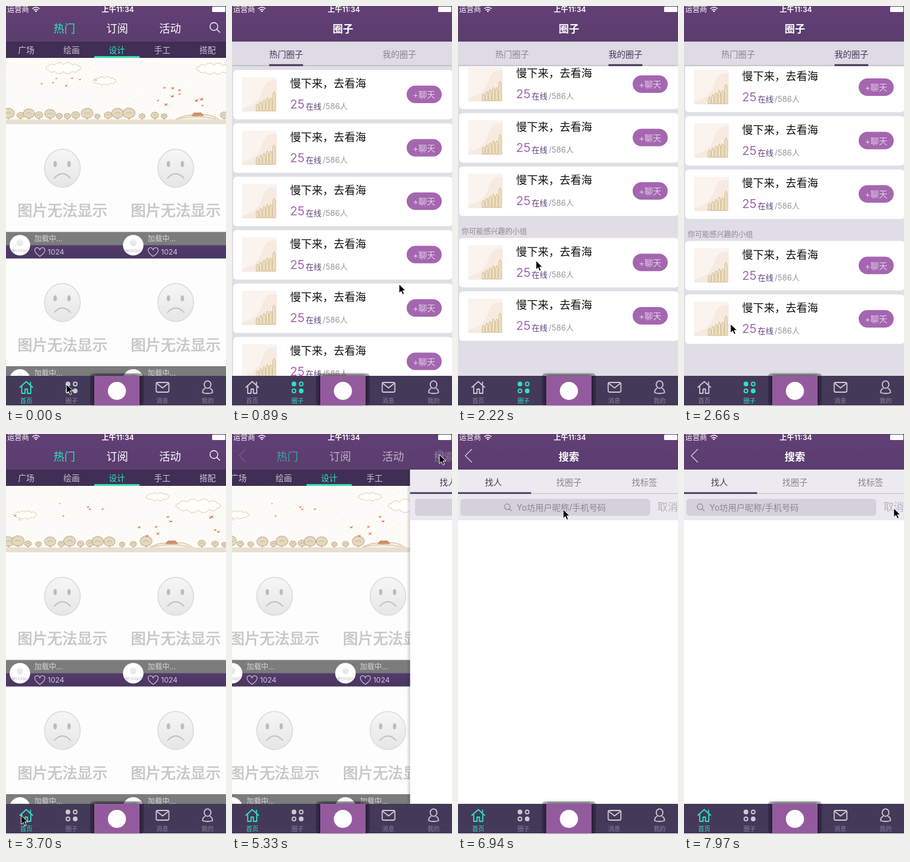
An HTML page for the animation above (8000 ms loop, 364 by 663 pixels).

```html
<!DOCTYPE html>
<html lang="zh-CN">
<head>
<meta charset="utf-8">
<style>
html, body { margin: 0; width: 100%; height: 100%; overflow: hidden; background: #fff; }
svg { display: block; font-family: Inter, "Noto Sans CJK SC", "Noto Sans CJK", sans-serif; }
.tab { stroke: #cdc8d5; stroke-width: 1.8; fill: none; stroke-linejoin: round; stroke-linecap: round; }
.tab text { fill: #8b8396; stroke: none; }
.tab .dot { fill: #cdc8d5; }
.tab.on { stroke: #2be6c0; }
.tab.on text, .tab.on .dot { fill: #2be6c0; }
#fail text { stroke: #c6c6c6; stroke-width: .7; }
#tile { filter: drop-shadow(0 -1px 3px rgba(0, 0, 0, .6)); }
</style>
</head>
<body>
<svg id="stage" width="364" height="663" viewBox="0 0 364 663"></svg>
<script>
const LOOP = 8000, STEP = 147.7, PAGE = 375;
const GREEN = '#2be6c0', PLUM = '#a566b0', DARK = '#433557', GREY = '#88848e';

// Markup helpers
const text = (x, y, s, size, fill, anchor = 'start', weight = 400) =>
  `<text x="${x}" y="${y}" font-size="${size}" fill="${fill}" text-anchor="${anchor}" font-weight="${weight}">${s}</text>`;
const mid = (x, y, s, size, fill, weight) => text(x, y, s, size, fill, 'middle', weight);
const rect = (x, y, w, h, fill, r = 0) =>
  `<rect x="${x}" y="${y}" width="${w}" height="${h}" rx="${r}" fill="${fill}"/>`;
const line = (d, stroke, w = 1, fill = 'none') =>
  `<path d="${d}" stroke="${stroke}" stroke-width="${w}" fill="${fill}"/>`;
const group = (id, body) => `<g id="${id}">${body}</g>`;
const times = (n, f) => Array.from({ length: n }, (_, i) => f(i)).join('');

// Seeded random numbers: returns rnd(low, high)
function seeded(seed) {
  return (lo, hi) => {
    seed = (seed * 16807) % 2147483647;
    return lo + (hi - lo) * seed / 2147483647;
  };
}

// Scalloped outline used for clouds and trees
function blob(x, y, rx, ry, fill, stroke) {
  const n = 12, point = i => [x + rx * Math.cos(i * Math.PI * 2 / n), y + ry * Math.sin(i * Math.PI * 2 / n)];
  let d = `M${point(0)}`;
  for (let i = 1; i <= n; i++) {
    const a = point(i - 1), b = point(i), r = Math.hypot(a[0] - b[0], a[1] - b[1]) * .6;
    d += `A${r} ${r} 0 0 1 ${b}`;
  }
  return line(d + 'Z', stroke, .8, fill);
}
const cloud = ([x, y, rx]) => blob(x, y, rx, 2 + rx / 8, '#fffefa', '#cbbd98');
const tree = (x, r) =>
  line(`M${x} ${186 - r}V190`, '#a48d5f') + blob(x, 187 - r, r, r * .8, '#e3d8c0', '#a89367') +
  line(`M${x - r / 2} ${188 - r}q${r / 2} -4 ${r} 0`, '#b49f73', .7);
const bird = (x, y, s) =>
  `<path transform="translate(${x} ${y}) scale(${s})" d="M-4 -2L0 0L3 -3L2 1L4 2L0 2L-3 3L-1 1Z" fill="#e2714c"/>`;

function banner(id, seed, clouds, hill) {
  const rnd = seeded(seed);
  let trees = '';
  for (let x = 4; x < 364; x += rnd(13, 22)) {
    if (Math.abs(x - hill) > 38) trees += tree(x, rnd(0, 1) < .25 ? rnd(8, 10) : rnd(4, 6.5));
  }
  return group(id,
    rect(-4, 86, PAGE, 110, '#fefdfb', 6) + rect(-4, 86, PAGE, 110, 'url(#grain)', 6) +
    clouds.map(cloud).join('') +
    line(`M${hill - 38} 190q22 -13 38 -8q22 -7 40 8`, '#b49f73', .8, '#f8f1e4') +
    line(`M${hill - 8} 182h20l-4 -5h-12z`, '#a48d5f', .7, '#de8a66') +
    line(`M${hill - 30} 187q30 -7 62 0`, '#b49f73', .7) +
    trees + rect(-4, 188, PAGE, 8, '#e9dfd0') +
    times(7, () => bird(rnd(15, 160), rnd(105, 150), rnd(.4, .7))) +
    times(10, () => bird(rnd(hill - 80, 352), rnd(133, 170), rnd(.6, 1))));
}

const face = `<ellipse rx="29.5" ry="31.5" fill="url(#skin)" stroke="#dadada" stroke-width="1.6"/>
  <ellipse cx="-12" cy="-7" rx="2.8" ry="5" fill="#bcbcbc"/><ellipse cx="11" cy="-7" rx="2.8" ry="5" fill="#bcbcbc"/>
  <path d="M-14 17Q0 1 14 17" fill="none" stroke="#c0c0c0" stroke-width="1.8"/>`;

const post = (x, y) => `<g transform="translate(${x} ${y})">
  ${rect(-4, 0, 188, 179, '#fdfdfd')}
  <use href="#fail" x="93.3" y="73"/>
  ${rect(-4, 178.5, 188, 22.5, '#7c7c7c') + rect(-4, 200.5, 188, 22, 'url(#band)')}
  ${text(47, 194, '加载中...', 12, '#d6d6d6') + text(69, 216, '1024', 12, '#d0c8da')}
  ${line('M56 219C44 211 47 204.500 52 204.500Q55 205 56 208Q57 205 60 204.500C65 204.500 68 211 56 219Z', '#cfc6d8', 1.2)}
  <circle cx="23" cy="200.5" r="17" fill="#fff"/>
  <use href="#fail" transform="translate(23 196.500) scale(.18)"/></g>`;

const rnd = seeded(77);
const skyline = times(6, i => {
  const h = rnd(8, 17) + 2.5 * i;
  return line(`M${40 + i * 5.5} 68v${-h}l2 -4l2 4v${h}z`, '#c4a873', .7, '#efe2c6');
});
const card = y => `<g transform="translate(0 ${y})">
  ${rect(2, 0, 363, 82, '#fff', 6) + rect(17, 12, 57, 57, '#faf3ee')}
  ${line('M17 64Q44 58 50 36T74 18V69H17Z', 'none', 0, '#f6eae1') + skyline}
  ${text(96, 29, '慢下来，去看海', 18, '#111')}
  ${text(96, 64, '25', 20, PLUM) + text(122, 65, '在线', 13, '#5d3d78') + text(150, 65, '/586人', 13, '#98959c')}
  ${rect(289, 26, 58, 29, PLUM, 14.5) + mid(318, 46, '+聊天', 14, '#e2d0e7')}</g>`;
const cards = (n, y) => times(n, i => card(y + 88.5 * i));

const tab = (id, x, label, icon) =>
  `<g class="tab" id="${id}">${icon}${mid(x, 658, label, 10, '')}</g>`;
const lens = (x, y, r, color, w) =>
  `<circle cx="${x}" cy="${y}" r="${r}" fill="none" stroke="${color}" stroke-width="${w}"/>` +
  line(`M${x + r * .7} ${y + r * .7}l${r * .85} ${r * .85}`, color, w);

const defs = `<defs>
  <linearGradient id="nav" x2="0" y2="1"><stop stop-color="#633f76"/><stop offset="1" stop-color="#5a3d6e"/></linearGradient>
  <linearGradient id="band" x2="0" y2="1"><stop stop-color="#533b6b"/><stop offset="1" stop-color="#493662"/></linearGradient>
  <linearGradient id="edge"><stop stop-opacity="0"/><stop offset="1" stop-opacity=".18"/></linearGradient>
  <linearGradient id="skin" x2="0" y2="1"><stop stop-color="#f6f6f6"/><stop offset="1" stop-color="#e6e6e6"/></linearGradient>
  <pattern id="grain" width="6" height="5" patternUnits="userSpaceOnUse" patternTransform="rotate(20)">
    <circle cx="2" cy="1.500" r=".7" fill="#e8dfca"/><circle cx="5" cy="4" r=".5" fill="#ece5d4"/></pattern>
  <g id="fail">${face}${mid(0, 79, '图片无法显示', 24.8, '#c6c6c6')}</g></defs>`;

const home = group('home',
  rect(-4, 59, PAGE, 554, '#412e54') +
  ['广场', '绘画', '设计', '手工', '搭配'].map((s, i) =>
    mid(33.5 + 75 * i, 78, s, 13.5, i == 2 ? GREEN : '#cdc5d5')).join('') +
  rect(146, 83, 75, 3, '#33dfae') +
  banner('bannerA', 5, [[95, 103, 29], [163, 124, 19], [344, 104, 29]], 315) +
  banner('bannerB', 11, [[32, 134, 19], [251, 104, 19], [318, 119, 37]], 272) +
  times(4, i => post(187.5 * (i & 1), 196 + 222.5 * (i >> 1))));

const circle = group('circle',
  rect(0, 59, 364, 554, '#e0dde6') +
  group('hotList', cards(6, 106)) +
  group('myList', cards(3, 106) + text(6, 395, '你可能感兴趣的小组', 12, '#8b8791') + cards(2, 401.5)) +
  rect(0, 59, 364, 40, '#dedbe4') + rect(0, 98, 364, 1.5, '#bcb8c3') +
  group('tabHot', mid(89.5, 85, '热门圈子', 14, 'inherit')) +
  group('tabMy', mid(277, 85, '我的圈子', 14, 'inherit')) +
  group('bar', rect(0, 96.5, 56, 3, DARK)));

const search = group('search',
  rect(-10, 59, 6, 554, 'url(#edge)') +
  rect(-4, 59, PAGE, 554, '#fff') + rect(-4, 59, PAGE, 40, '#ece9f1') + rect(-4, 98, PAGE, 1.5, '#c4c1ca') +
  rect(-4, 96.5, 125, 3, DARK) + rect(-4, 99.5, PAGE, 43.5, '#ebe8f0') +
  ['找人', '找圈子', '找标签'].map((s, i) => mid(58.5 + 125 * i, 85, s, 14, i ? GREY : '#443c4e')).join('') +
  rect(4, 107.5, 314, 28, '#d4d1da', 5) +
  group('hint', lens(81.5, 120.5, 4.6, GREY, 1.2) + text(97, 126.5, 'Yo坊用户昵称/手机号码', 14, '#8b8891')) +
  text(330, 127, '取消', 17, '#b7b3be'));

const bars = rect(0, 0, 364, 59, 'url(#nav)') +
  group('navHome', ['热门', '订阅', '活动'].map((s, i) => mid(96.5 + 87.5 * i, 44, s, 18, i ? '#fff' : GREEN)).join('')) +
  group('navLens', lens(344, 34, 6.5, '#fff', 1.3)) +
  group('navCircle', mid(183.5, 43.5, '圈子', 17, '#fff', 600)) +
  group('navTitle', mid(183.5, 43.5, '搜索', 17, '#fff', 600)) +
  group('navBack', line('M23 25L12 36L23 47', '#d5cadd', 1.4)) +
  text(2, 10, '运营商', 12, '#fff') +
  line('M43.500 4.500q6 -5 12 0M45.800 7q3.700 -3 7.400 0', '#fff', 1.6) + line('M47.500 8.200q2 -1.500 4 0l-2 2z', 'none', 0, '#fff') +
  mid(185, 10, '上午11:34', 12, '#fff', 600) + rect(341, 1, 22, 9, '#fff', 1.5) +
  rect(0, 613, 364, 49, '#45395a') + rect(0, 662, 364, 1, '#fff') +
  tab('tabHome', 33.5, '首页', '<path d="M23 632L33.500 622.500L44 632M26 630V642H31.500V635H35.500V642H41V630M40.500 628V623.500"/>') +
  tab('tabCircle', 108.5, '圈子', times(4, i =>
    `<circle class="${i % 3 ? '' : 'dot'}" cx="${102.5 + 12 * (i & 1)}" cy="${626.5 + 11.5 * (i >> 1)}" r="3"/>`)) +
  tab('tabMail', 258.5, '消息', '<rect x="248.500" y="624" width="21" height="16" rx="2.500"/><path d="M250 626L259 633L268 626"/>') +
  tab('tabMe', 333.5, '我的', '<ellipse cx="333.500" cy="627.500" rx="5.500" ry="6.200"/><path d="M329 634Q325 636 325.500 641Q333.500 643.500 341.500 641Q342 636 338 634"/>') +
  rect(139, 609, 89, 53, 'rgba(20,10,30,.3)', 5) +
  group('tile', rect(146, 613, 75, 49, '#935b9e')) + '<circle cx="183.5" cy="638" r="15" fill="#fff"/>' +
  '<path id="cursor" d="M0 0V15L3.500 11.800L6 17.300L8.500 16.200L6.100 10.800H11Z" stroke="#fff"/>';

document.getElementById('stage').innerHTML = defs + home + circle + search + bars;
// These labels inherit their colour from the group
document.querySelectorAll('#tabHot text, #tabMy text, .tab text').forEach(e => e.removeAttribute('fill'));

const $ = id => document.getElementById(id);
const move = (id, x, y = 0) => $(id).setAttribute('transform', `translate(${x} ${y})`);
const show = (id, on) => $(id).style.display = on ? '' : 'none';
const fade = (id, o) => $(id).style.opacity = Math.max(0, o);

function ease(t, from, to) {
  const u = Math.min(1, Math.max(0, (t - from) / (to - from)));
  return u * u * (3 - 2 * u);
}

// Pointer legs: start time, end time, destination
const legs = [
  [148, 1184, 320, 420], [1184, 1480, 92, 416], [1480, 2220, 129, 422], [2368, 2960, 25, 632],
  [3700, 4144, 120, 480], [4440, 5180, 343, 34], [5624, 5920, 293, 70], [5920, 6956, 174, 125], [7250, 7992, 347, 123]];
function pointer(t) {
  let x = 100, y = 627;
  for (const [from, to, toX, toY] of legs) {
    const k = ease(t, from, to);
    x += (toX - x) * k;
    y += (toY - y) * k;
  }
  return [x, y];
}

function draw(now) {
  const t = Math.floor((now % LOOP + 10) / STEP) * 148;
  const inCircle = t >= 148 && t < 3700;
  const swipe = PAGE * (1 - ease(t, 1184, 1591));
  const pull = 34 * (ease(t, 2072, 2368) - ease(t, 2442, 2812));
  const push = ease(t, 5212, 5612);

  show('home', !inCircle);
  show('circle', inCircle);
  show('search', push > 0);
  show('bannerA', t < 148);
  show('bannerB', t >= 148);
  $('tabHome').classList.toggle('on', !inCircle);
  $('tabCircle').classList.toggle('on', inCircle);

  move('hotList', swipe - PAGE);
  move('myList', swipe, -pull);
  move('bar', 249 - swipe / 2);
  $('tabHot').style.fill = swipe > 30 ? DARK : GREY;
  $('tabMy').style.fill = swipe > 30 ? GREY : DARK;

  move('home', -112 * push);
  move('search', PAGE * (1 - push));
  move('hint', -55 * ease(t, 7104, 7400));

  show('navHome', !inCircle);
  show('navLens', !inCircle);
  show('navCircle', inCircle);
  move('navHome', -25 * push);
  fade('navHome', 1 - 2 * push);
  fade('navLens', 1 - 4 * push);
  move('navTitle', 210 * (1 - push));
  fade('navTitle', push);
  fade('navBack', push);

  move('cursor', ...pointer(t));
}

const start = performance.now();
(function frame() {
  draw(performance.now() - start);
  requestAnimationFrame(frame);
})();
</script>
</body>
</html>
```
